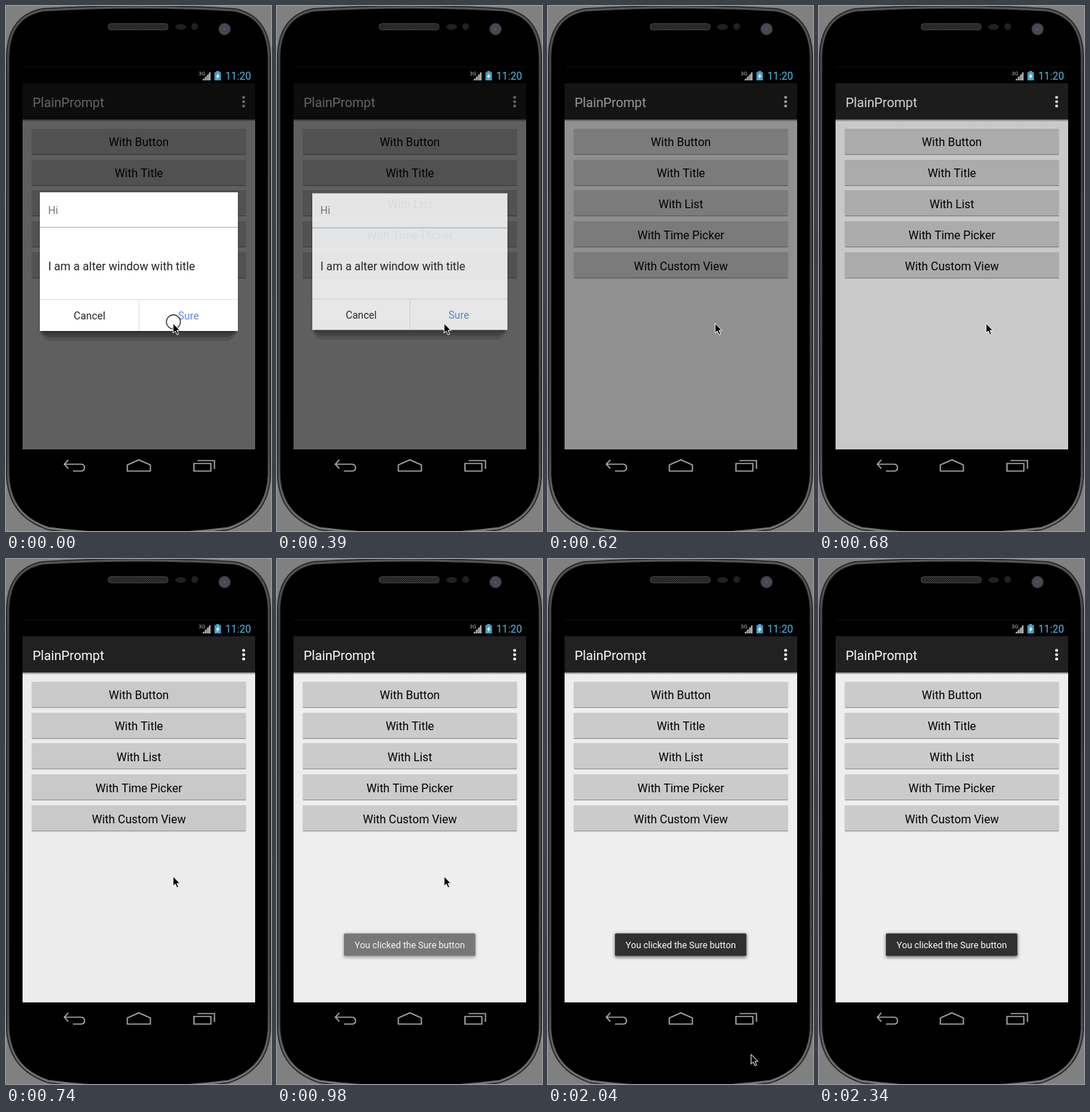
An HTML page that plays this animation: 368x727 px, repeating every 3.19 s.

```html
<!DOCTYPE html>
<html lang="en">
<head>
<meta charset="utf-8">
<title>Dialog and toast</title>
<style>
  html, body { margin: 0; width: 100%; height: 100%; overflow: hidden; background: #808080; }
  svg { display: block; width: 368px; height: 727px; font-family: Roboto, sans-serif; font-kerning: none; }
  .mid { text-anchor: middle; }
  .nav { fill: none; stroke: #a9a9a9; stroke-width: 1.7; }
</style>
</head>
<body>
<svg viewBox="0 0 368 727">
  <defs>
    <linearGradient id="rim" x2="0" y2="1">
      <stop offset="0" stop-color="#555"/>
      <stop offset=".15" stop-color="#444"/>
      <stop offset=".85" stop-color="#4c4c4c"/>
      <stop offset="1" stop-color="#777"/>
    </linearGradient>
    <radialGradient id="lens">
      <stop offset="0" stop-color="#5e6270"/>
      <stop offset=".3" stop-color="#43464f"/>
      <stop offset=".75" stop-color="#484a54"/>
      <stop offset="1" stop-color="#303238"/>
    </radialGradient>
    <linearGradient id="edge" x2="0" y2="1">
      <stop offset="0" stop-color="#777375"/>
      <stop offset="1" stop-color="#eee"/>
    </linearGradient>
    <pattern id="mesh" width="3" height="3" patternUnits="userSpaceOnUse">
      <rect width="3" height="3" fill="#1b1b1b"/>
      <path d="M0 0L3 3M3 0L0 3" stroke="#3c3c3c" stroke-width=".7"/>
    </pattern>
    <filter id="soft" x="-10%" y="-30%" width="120%" height="170%">
      <feGaussianBlur stdDeviation="2"/>
    </filter>
    <path id="body" d="M3 70C4 32 20 12 51 6Q184 -2 317 6C348 12 364 32 365 70V650C363 689 344 711 309 723Q184 739 59 723C24 711 5 689 3 650Z"/>
  </defs>

  <!-- phone body -->
  <rect width="368" height="727" fill="#808080"/>
  <use href="#body" stroke="#242424" stroke-width="6"/>
  <use href="#body" stroke="url(#rim)" stroke-width="3"/>
  <rect x="142" y="24.500" width="83" height="8.500" rx="3.500" fill="url(#mesh)" stroke="#484848"/>
  <ellipse cx="242.500" cy="29" rx="7.500" ry="4" fill="#202020"/>
  <circle cx="262" cy="28.500" r="4.700" fill="#202020"/>
  <circle cx="303.500" cy="32" r="8.500" fill="url(#lens)"/>
  <path d="M23 84.500H346" stroke="#0c0c0c"/>

  <!-- status bar -->
  <text x="267.500" y="95.500" font-size="7.500" fill="#bbb">3G</text>
  <path d="M272 103L284 91V103Z" fill="#555"/>
  <path d="M274.500 103V101M277.500 103V98M280.500 103V95M283 103V92" stroke="#c8c8c8" stroke-width="1.600"/>
  <path d="M292 90h4v1.500h2.500V103h-9V91.500H292Z" fill="#4a9fc4"/>
  <path d="M295 93L291.500 98H293.500L292.500 101.500L296.700 96.500H294.500Z" fill="#fff"/>
  <text x="304.500" y="102" font-size="14.400" fill="#55bde8">11:20</text>

  <!-- app -->
  <rect x="23" y="107" width="323" height="507" fill="#eee"/>
  <rect x="23" y="107" width="323" height="50" fill="#212121"/>
  <rect x="23" y="157" width="323" height="3" fill="url(#edge)"/>
  <text x="37" y="139.500" font-size="18" fill="#fff">PlainPrompt</text>
  <path d="M330 126.500v0m0 6v0m0 6v0" stroke="#fff" stroke-width="4.200" stroke-linecap="round"/>
  <g id="list"></g>
  <rect id="dim" x="23" y="107" width="323" height="507"/>

  <g id="dialog">
    <rect x="48" y="420" width="272" height="44" rx="15" fill-opacity=".14"/>
    <rect x="50" y="425" width="268" height="34" rx="12" fill-opacity=".2"/>
    <rect x="48" y="262" width="273" height="191" rx="3" fill-opacity=".3" filter="url(#soft)"/>
    <rect x="47" y="258" width="275" height="192" fill="#fff"/>
    <path d="M47 306.500H322" stroke="#84b8e8"/>
    <path d="M47 406.500H322M184.500 407V450" stroke="#dfdfdf"/>
    <text x="58.500" y="287.500" font-size="14.400" fill="#777">Hi</text>
    <text x="58.500" y="366" font-size="16.100" fill="#222">I am a alter window with title</text>
    <g class="mid" font-size="14.400">
      <text x="116" y="434" fill="#222">Cancel</text>
      <text x="253.500" y="434" fill="#5a88d8">Sure</text>
    </g>
  </g>

  <g id="toast">
    <rect x="92.500" y="519" width="183.500" height="33" rx="2" fill-opacity=".5" filter="url(#soft)"/>
    <rect x="93" y="518.500" width="182.500" height="31" rx="1.500" fill="#303030"/>
    <text class="mid" x="184.300" y="539" font-size="12.600" fill="#fff">You clicked the Sure button</text>
  </g>

  <!-- navigation keys -->
  <g class="nav">
    <path d="M86.500 628.500L81 634.500L86.500 640.500M81 634.500H104Q109 634.500 109 639.200T104 644H93"/>
    <path d="M168.500 644V635.500L184.500 628.500L200.500 635.500V644Z"/>
    <path d="M261 633.500H284.500V644H261ZM266 629.500H289.500V641"/>
  </g>

  <circle id="ring" cx="232.500" cy="437.500" r="9.800" fill="none" stroke="#111" stroke-width="1.200"/>
  <path id="pointer" d="M0 0V13.500L3.100 10.700L5.400 15.800L7.700 14.800L5.500 9.800H9.600Z" stroke="#fff"/>
</svg>

<script>
const LOOP = 3190, STEP = 60;
const $ = id => document.getElementById(id);

const labels = ["With Button", "With Title", "With List", "With Time Picker", "With Custom View"];
$("list").innerHTML = labels.map((label, i) => {
  const y = 170 + Math.round(i * 42.7);
  return `
    <rect x="35.500" y="${y}" width="298" height="35.500" rx="1" fill="#cbcbcb"/>
    <path d="M36 ${y + 35.5}H333" stroke="#999"/>
    <path d="M36 ${y + 36.5}H333" stroke="#dadada"/>
    <text class="mid" x="184.500" y="${194 + i * 43}" font-size="16">${label}</text>`;
}).join("");

// Pointer waypoints: time, x, y.
const path = [
  [1340, 232, 439], [1400, 232, 450], [1690, 275, 604],
  [1890, 289, 664], [2035, 282, 686], [2280, 269, 636]
];

const clamp = v => Math.min(1, Math.max(0, v));
const ease = v => (1 - Math.cos(Math.PI * clamp(v))) / 2;
const mix = (a, b, v) => a + (b - a) * v;

const steps = (t, start, step = STEP) => Math.max(0, Math.floor((t - start) / step) + 1);

function along(points, t) {
  const i = points.findIndex(p => p[0] > t);
  if (i < 1) return points.at(i).slice(1);
  const [a, b] = [points[i - 1], points[i]];
  const v = (t - a[0]) / (b[0] - a[0]);
  return [mix(a[1], b[1], v), mix(a[2], b[2], v)];
}

const fade = (id, value) => $(id).setAttribute("opacity", value);
const place = (id, value) => $(id).setAttribute("transform", value);

function draw(t) {
  const shown = 1 - ease(steps(t, 390) / 4);
  fade("dialog", shown);
  place("dialog", `translate(184.5 354) scale(${mix(.9, 1, shown)}) translate(-184.5 -354)`);
  fade("dim", .6 * (1 - ease((steps(t, 560) - .5) / 3.8)));
  fade("toast", 1 - (1 - clamp(steps(t, 920) / 6)) ** 2.4);
  fade("ring", t < STEP ? 1 : 0);

  const pace = 57.7;
  const [x, y] = along(path, 1400 + (steps(t, 1400, pace) - 1) * pace);
  fade("pointer", t < 2340 ? 1 : 0);
  place("pointer", `translate(${x} ${y})`);
}

const start = performance.now();
function tick() {
  draw((performance.now() - start) % LOOP);
  requestAnimationFrame(tick);
}
tick();
</script>
</body>
</html>
```
